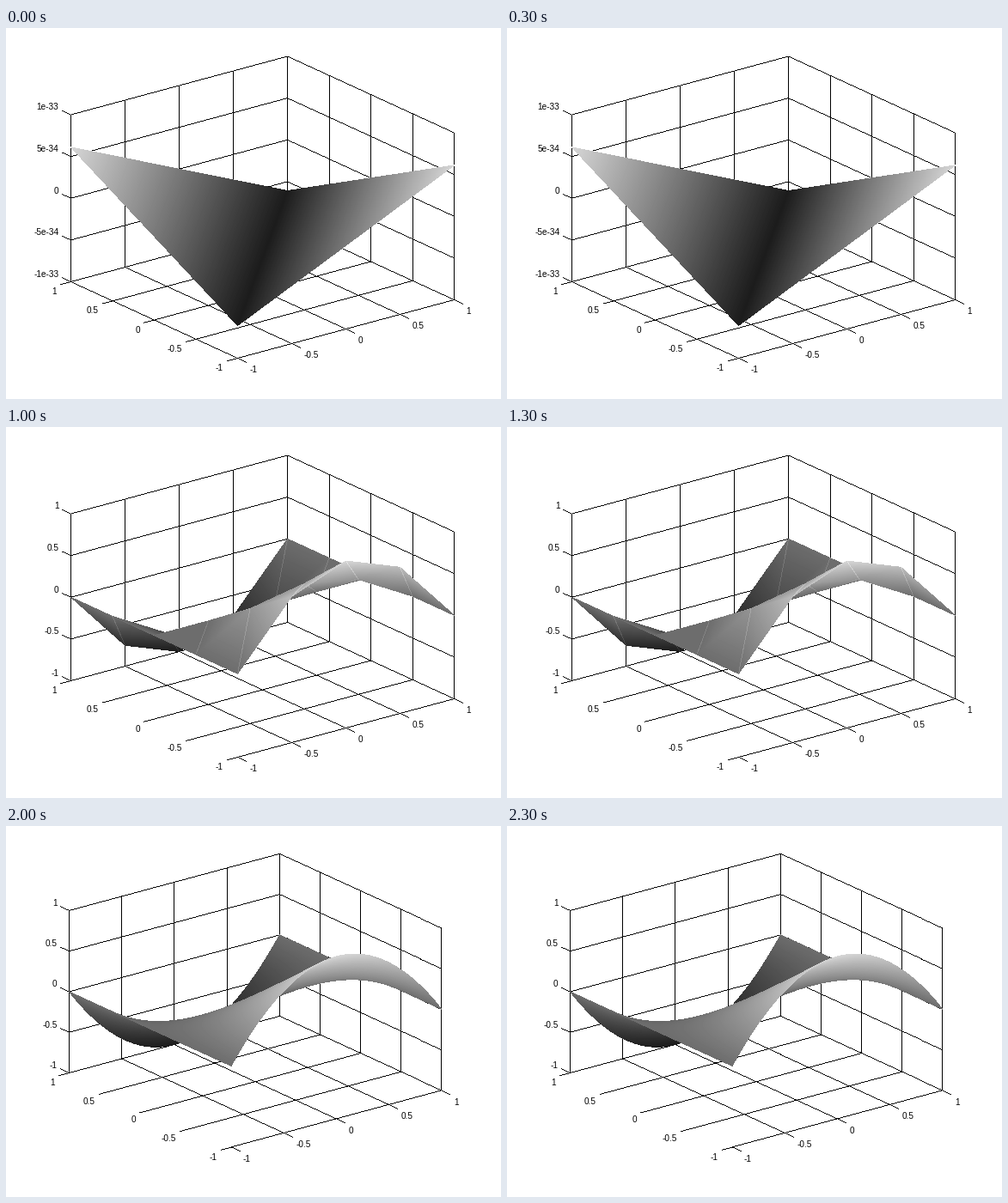
Animation, 576 px wide and 432 px high, one loop 2500 ms. Source, as a matplotlib script:

```python
import numpy as np
import matplotlib.pyplot as plt
from matplotlib.animation import ArtistAnimation

W, H = 576, 432
STEP_MS = 500
DARK, LIGHT = 28 / 255, 214 / 255
TICKS = [-1, -0.5, 0, 0.5, 1]

plt.rcParams["font.family"] = "Liberation Sans"
fig = plt.figure(figsize=(W / 72, H / 72), dpi=72, facecolor="white")
ax = fig.add_axes([0, 0, 1, 1])
ax.axis("off")


class Box:
    """Orthographic plot box; corner is the screen point of (-1, -1, zmin)."""

    def __init__(self, corner, scale, zlim):
        self.corner, self.scale, self.zlim = corner, scale, zlim

    def project(self, x, y, z):
        lo, hi = self.zlim
        h = (z - lo) / (hi - lo)
        px = self.corner[0] + self.scale * (126 * (x + 1) - 97 * (y + 1))
        py = self.corner[1] - self.scale * (34 * (x + 1) + 44.5 * (y + 1) + 194.5 * h)
        return px + 0.5, py + 0.5


def draw_line(img, start, end, shade=0.0):
    """One-pixel line without smoothing."""
    steps = int(np.ceil(max(abs(end[0] - start[0]), abs(end[1] - start[1])))) + 1
    cols = np.linspace(start[0], end[0], steps).astype(int)
    rows = np.linspace(start[1], end[1], steps).astype(int)
    img[rows, cols] = shade


def add_label(x, y, text, ha):
    return ax.text(x, y, text, ha=ha, va="center_baseline", fontsize=10, color="black")


def draw_axes(img, box, zticks, zlabels, left_edge):
    lo, hi = box.zlim
    labels = []

    def path(*points):
        screen = [box.project(*p) for p in points]
        for start, end in zip(screen, screen[1:]):
            draw_line(img, start, end)

    def tick(point, dx, dy):
        px, py = box.project(*point)
        draw_line(img, (px, py), (px + dx, py + dy))
        return px + dx, py + dy

    for t in TICKS:
        if t > -1 or left_edge:
            path((t, -1, lo), (t, 1, lo))
        path((t, 1, lo), (t, 1, hi))
        path((-1, t, lo), (1, t, lo), (1, t, hi))
        x, y = tick((t, -1, lo), 10, 4.6)
        labels.append(add_label(x + 4, y + 8, f"{t:g}", "left"))
        x, y = tick((-1, t, lo), -12, 3.2)
        labels.append(add_label(x - 4.5, y + 7.5, f"{t:g}", "right"))
    for z, text in zip(zticks, zlabels):
        path((-1, 1, z), (1, 1, z), (1, -1, z))
        x, y = tick((-1, 1, z), -10, -4.6)
        labels.append(add_label(x - 4, y - 5, text, "right"))
    return labels


def fill_triangle(img, depth, pts, far, tone, seam):
    """Gouraud triangle, half a pixel padded, with depth test.

    The first and last points span the cell diagonal, where the seam shows.
    """
    a, b, c = (np.array(p) for p in pts)

    def cross(p, q, x, y):
        return (q[0] - p[0]) * (y - p[1]) - (q[1] - p[1]) * (x - p[0])

    area = cross(a, b, *c)
    if abs(area) < 1e-6:
        return
    x0, y0 = np.min([a, b, c], axis=0).astype(int)
    x1, y1 = np.max([a, b, c], axis=0).astype(int) + 1
    gy, gx = np.mgrid[y0:y1, x0:x1] + 0.5
    weights, inside = [], True
    for p, q in ((b, c), (c, a), (a, b)):
        w = cross(p, q, gx, gy) / area
        inside = inside & (w * abs(area) >= -0.5 * np.hypot(*(q - p)))
        weights.append(np.maximum(w, 0))
    weights = np.array(weights) / sum(weights)

    dist = np.tensordot(far, weights, 1)
    value = np.tensordot(tone, weights, 1)
    value += seam * (weights[1] * abs(area) < 0.5 * np.hypot(*(c - a)))
    view = np.s_[y0:y1, x0:x1]
    hit = inside & (dist < depth[view])
    depth[view][hit] = dist[hit]
    img[view][hit] = value[hit]


def draw_surface(img, box, func, n, seam):
    u = np.linspace(-1, 1, n)
    X, Y = np.meshgrid(u, u, indexing="ij")
    Z = func(X, Y)
    px, py = box.project(X, Y, Z)
    far = 0.609 * X + 0.793 * Y
    level = (Z - Z.min()) / (Z.max() - Z.min())
    tone = DARK + (LIGHT - DARK) * level ** 1.2

    depth = np.full((H, W), np.inf)
    for i in range(n - 1):
        for j in range(n - 1):
            for mid in ((i + 1, j), (i, j + 1)):
                ids = [(i, j), mid, (i + 1, j + 1)]
                fill_triangle(img, depth,
                              [(px[k], py[k]) for k in ids],
                              [far[k] for k in ids],
                              [tone[k] for k in ids], seam)


def twist(x, y):
    return -0.61 * x * y


def pit(x, y):
    return -6.12 * (1 - abs(x)) * (1 - abs(y))


def saddle(x, y):
    return -y * (1 - x ** 2)


def draw_creases(img, box):
    """Creases running into the pit, cut off where the front rim hides them."""
    bottom = np.array(box.project(0, 0, -6.12))
    for x, y, part, shade in ((0, 1, 0.735, 0), (1, 0, 0.585, 0), (1, 1, 0.735, 0.88)):
        top = np.array(box.project(x, y, 0))
        draw_line(img, top, top + part * (bottom - top), shade)


def scene(box, func, n, zticks, zlabels, seam=0.0, left_edge=False):
    img = np.ones((H, W))
    labels = draw_axes(img, box, zticks, zlabels, left_edge)
    draw_surface(img, box, func, n, seam)
    if func is pit:
        draw_creases(img, box)
    picture = ax.imshow(img, cmap="gray", vmin=0, vmax=1, extent=(0, W, H, 0),
                        aspect="auto", interpolation="nearest")
    return [picture] + labels


unit = Box((269, 384), 1, (-1, 1))
deep = Box((269, 384), 1, (-8, 2))
small = Box((261.5, 373.5), 0.972, (-1, 1))
plain = [f"{t:g}" for t in TICKS]
deep_ticks = range(-8, 3, 2)

scenes = [
    scene(unit, twist, 2, TICKS, ["-1e-33", "-5e-34", "0", "5e-34", "1e-33"],
          left_edge=True),
    scene(deep, pit, 3, deep_ticks, [f"{t}e-17" if t else "0" for t in deep_ticks],
          left_edge=True),
    scene(unit, saddle, 5, TICKS, plain, seam=0.09),
    scene(unit, saddle, 9, TICKS, plain, seam=0.03),
    scene(small, saddle, 33, TICKS, plain),
]

ax.set_xlim(0, W)
ax.set_ylim(H, 0)
anim = ArtistAnimation(fig, scenes, interval=STEP_MS, repeat=True, repeat_delay=0)
plt.show()
```
